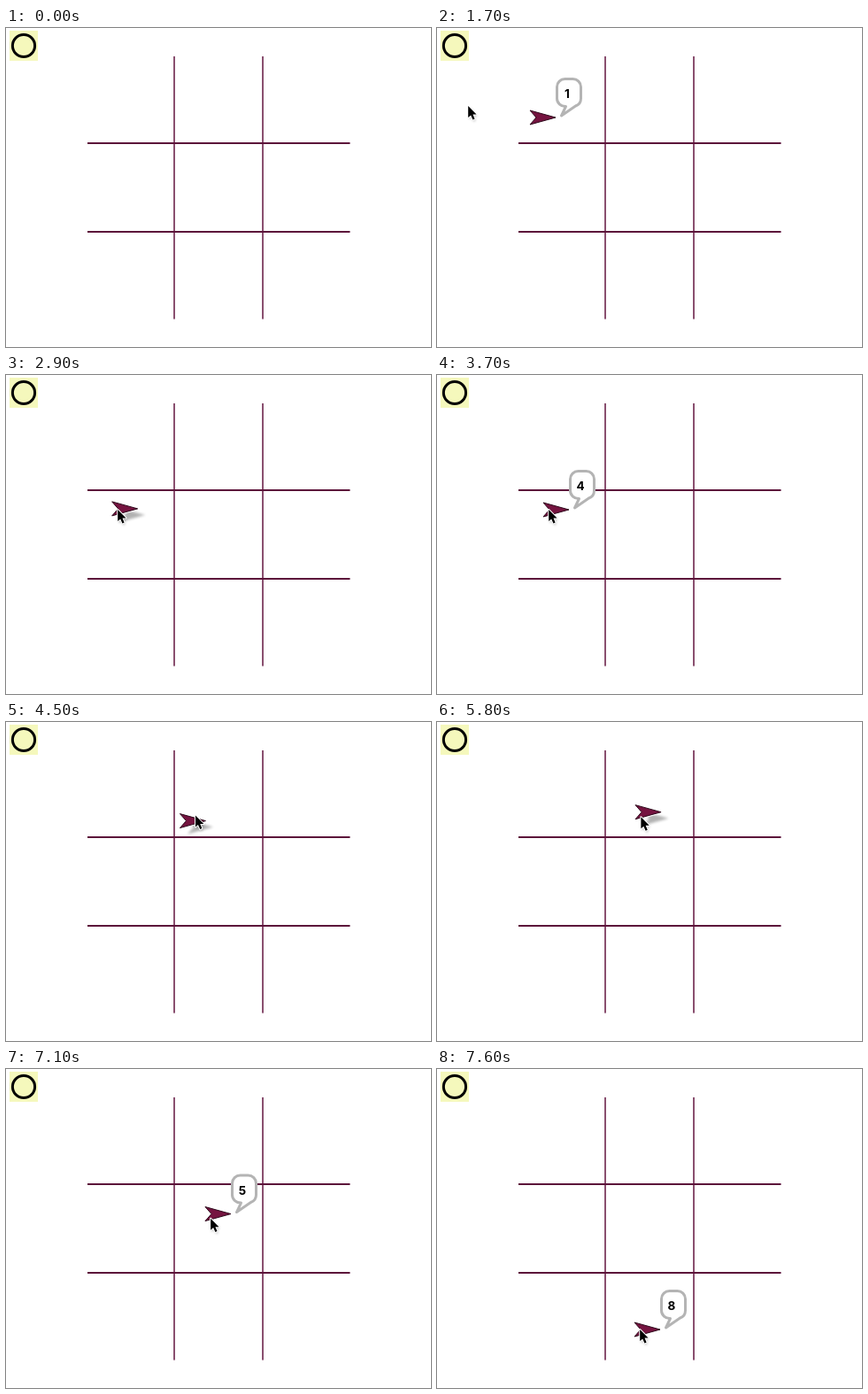
An HTML page for the animation above (8000 ms loop, 480 px wide and 360 px high).

```html
<!DOCTYPE html>
<html lang="en">
<head>
<meta charset="utf-8">
<title>Numbered grid</title>
<style>
  html, body { margin: 0; width: 100%; height: 100%; overflow: hidden; background: #fff; }
  svg { display: block; width: 100vw; height: 100vh; }
  text { font: bold 13.5px Inter, "Liberation Sans", sans-serif; text-anchor: middle; }
</style>
</head>
<body>
<svg viewBox="0 0 480 360">
  <defs>
    <filter id="soft" x="-30%" y="-50%" width="160%" height="200%">
      <feGaussianBlur stdDeviation="1.5"/>
    </filter>
    <path id="dart" d="M0-8 29 0 0 8 7 0Z"/>
    <path id="arrow" d="M.2 1V14L3.2 11.4 5.5 16.4 7.6 15.4 5.5 10.5H9.6Z"/>
  </defs>

  <rect x="4" y="3" width="32" height="34" fill="#f5f8bc"/>
  <circle cx="20" cy="20" r="12.6" fill="none" stroke="#000" stroke-width="3"/>

  <g stroke="#5c123a">
    <path d="M190 32V328.5M290 32V328.5" stroke="#641640" stroke-width="1.5"/>
    <path d="M92 130H388.5M92 230H388.5" stroke-width="2"/>
  </g>

  <g id="sprite">
    <use id="shade" href="#dart" x="8.5" y="7" fill="#000" opacity=".3" filter="url(#soft)"/>
    <use href="#dart" stroke="#fff" stroke-width="3"/>
    <use href="#dart" fill="#751440" stroke="#2e0a1c" stroke-width="1"/>
    <g id="bubble">
      <path d="M39.5-43.5H48.5a9 9 0 0 1 9 9V-21.5a9 9 0 0 1-6 8.5L35.5-2 40.5-12.5a9.5 9 0 0 1-10-9V-34.5a9 9 0 0 1 9-9Z"
        fill="#fff" stroke="#b4b4b4" stroke-width="3" stroke-linejoin="round"/>
      <text id="label" x="42" y="-22"></text>
    </g>
  </g>

  <g id="cursor">
    <use href="#arrow" x="1" y="2" fill="#000" opacity=".3" filter="url(#soft)"/>
    <use href="#arrow" fill="#000" stroke="#fff" stroke-width="2" stroke-linejoin="round" paint-order="stroke"/>
  </g>
</svg>

<script>
  const LOOP = 8000, TICK = 100;
  const APPEAR = 600, ENTER = 1700, ENTER_TIME = 800;
  const DRAG_TIME = 400, LAG = 35;   // the sprite trails the cursor slightly
  const GRIP = { x: 6, y: -1 };      // cursor relative to the sprite
  const ENTRY = { x: 35, y: 87 };

  // where the sprite rests, and when it is pulled there and let go
  const stops = [
    { x: 105, y: 101, cell: 1 },
    { x: 120, y: 152, cell: 4, pull: 2500, drop: 3100 },
    { x: 224, y: 97, cell: 2, pull: 4200, drop: 4900 },
    { x: 225, y: 163, cell: 5, pull: 5700, drop: 6200 },
    { x: 223, y: 294, cell: 8, pull: 7050, drop: 7600 }
  ];

  const $ = id => document.getElementById(id);
  const [sprite, shade, bubble, label, cursor] =
    ["sprite", "shade", "bubble", "label", "cursor"].map($);

  const show = (el, on) => { el.style.display = on ? "" : "none"; };
  const move = (el, p) => el.setAttribute("transform", `translate(${p.x} ${p.y})`);
  const mix = (a, b, p) => ({ x: a.x + (b.x - a.x) * p, y: a.y + (b.y - a.y) * p });
  const grip = p => ({ x: p.x + GRIP.x, y: p.y + GRIP.y });

  function ease(elapsed, span) {
    const p = Math.min(1, Math.max(0, elapsed / span));
    return p * p * (3 - 2 * p);
  }

  function draw(time) {
    const t = Math.floor(time / TICK) * TICK;
    const next = stops.findLastIndex(s => !s.pull || s.pull <= t);
    const to = stops[next], from = stops[next - 1] || to;

    const lead = ease(t - to.pull, DRAG_TIME);
    const follow = ease(t - to.pull - LAG, DRAG_TIME);
    const held = follow > 0.01 && t < to.drop;

    if (next) {
      move(sprite, mix(from, to, follow));
      move(cursor, grip(mix(from, to, lead)));
    } else {
      move(sprite, to);
      move(cursor, mix(ENTRY, grip(to), ease(t - ENTER, ENTER_TIME)));
    }
    show(sprite, t >= APPEAR);
    show(cursor, t >= ENTER);
    show(shade, held);
    show(bubble, !held);
    label.textContent = t < to.drop ? from.cell : to.cell;
  }

  const began = performance.now();
  function frame() {
    draw((performance.now() - began) % LOOP);
    requestAnimationFrame(frame);
  }
  frame();
</script>
</body>
</html>
```
